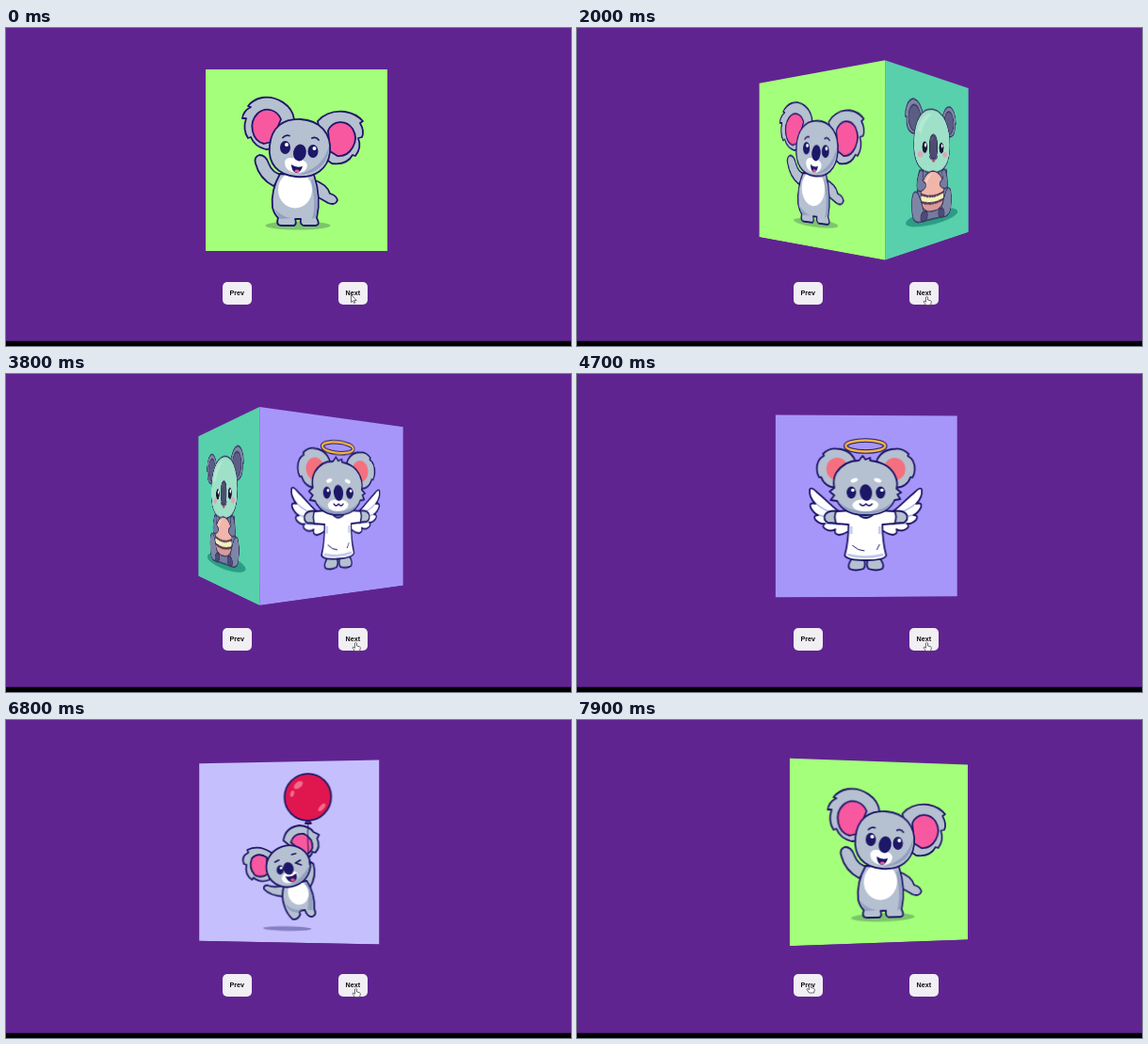
An HTML page for the animation above (8000 ms loop, 600x338 px).

```html
<!DOCTYPE html>
<html lang="en">
<head>
<meta charset="utf-8">
<title>Koala cube</title>
<style>
html, body { margin: 0; width: 100%; height: 100%; overflow: hidden; background: #602491; }
#stage { position: absolute; left: 0; top: 0; width: 600px; height: 338px; overflow: hidden; background: #602491; }
#floor { position: absolute; top: 332px; width: 600px; height: 5px; background: #000; border-top: 1px solid #451a69; }
#scene { position: absolute; left: 212px; top: 44px; width: 193px; height: 193px; perspective: 433px; }
/* The turning axis sits slightly left of the middle of the faces. */
#cube { position: absolute; width: 193px; height: 193px; transform-style: preserve-3d; transform-origin: 95px 50%; }
.face { position: absolute; width: 193px; height: 193px; backface-visibility: hidden; }
.btn {
  position: absolute; top: 270px; width: 30.5px; height: 24px; border-radius: 5px; background: #f1eff3;
  font: bold 7.2px/24px Arial, "Liberation Sans", sans-serif; text-align: center; color: #0c0c0c;
}
#cursor { position: absolute; left: 0; top: 0; }
.ink { stroke: #1d1768; stroke-width: 1.8; stroke-linejoin: round; stroke-linecap: round; }
.soft { stroke: #35315f; stroke-width: 1.4; stroke-linejoin: round; stroke-linecap: round; }
.line { fill: none; }
.fur { fill: #b5c0d0; }
.shade { fill: #93a0c2; }
.pink { fill: #f8589f; }
.white { fill: #fff; }
.navy { fill: #1d1768; }
</style>
</head>
<body>
<div id="stage">
  <div id="floor"></div>
  <div id="scene"><div id="cube">

    <svg class="face" viewBox="212 44 193 193" style="background:#a4ff7a">
      <ellipse cx="310" cy="210" rx="34.5" ry="4.5" fill="#7cc56c"/>
      <g class="ink fur">
        <path d="M306 97C304 82 288 72 272 74Q262 76 257 83L260 84Q252 88 251 96L255 96Q251 108 257 117L260 116Q264 126 276 129L286 128Z"/>
        <path d="M331 99Q342 87 360 89Q372 91 379 99L376 101Q381 110 378 116L374 117Q378 127 371 136L368 135Q362 146 346 144L338 138Z"/>
        <path class="pink" d="M292 97C288 87 276 83 267 91C257 101 261 120 274 123L282 121Z"/>
        <path class="pink" d="M342 109C347 98 361 97 368 107C376 120 366 137 352 136L344 131Z"/>
        <path d="M294 156Q283 155 279 144Q276 135 269 135Q263 137 265 144Q269 160 284 168Z"/>
        <path d="M326 161Q341 166 344 176Q351 178 352 183Q350 189 342 186Q332 180 327 178Z"/>
        <path d="M291 155Q281 172 283 191Q285 198 289 202Q286 210 293 210H306Q309 208 307 203H313Q312 209 316 210H329Q334 209 330 202Q335 180 327 156Z"/>
      </g>
      <path class="shade" d="M326 160Q333 181 329 201L325 203Q330 188 324 162ZM285 192Q293 201 303 202L291 203Z"/>
      <ellipse class="white" cx="307" cy="172" rx="18" ry="19.5"/>
      <path class="ink fur" d="M280 125C282 105 295 96 313 97C333 98 346 112 344 132C342 150 328 160 308 158C288 156 278 144 280 125Z"/>
      <path class="shade" d="M343 125C343 144 330 156 309 156C325 152 338 144 343 125Z"/>
      <path class="white" d="M296 143C297 136 306 138 311 140C319 140 323 146 317 152C311 156 296 154 296 143Z"/>
      <path class="navy" d="M303 145Q308 149 315 147Q313 154 308 154Q303 152 303 145Z"/>
      <ellipse cx="309" cy="152" rx="2.5" ry="1.5" class="pink"/>
      <g class="navy">
        <ellipse cx="312" cy="132.500" rx="6.800" ry="9" transform="rotate(10 312 132)"/>
        <ellipse cx="296.500" cy="127" rx="5.500" ry="7"/>
        <ellipse cx="326" cy="131" rx="5.500" ry="7"/>
      </g>
      <g class="white">
        <circle cx="298" cy="124" r="2"/><circle cx="327.500" cy="128" r="2"/>
      </g>
      <path class="ink line" d="M294 116.500Q297 113 301 114.500M325 117Q329 115 332 119"/>
    </svg>

    <svg class="face" viewBox="212 44 193 193" style="background:#58d0ac">
      <ellipse cx="310.500" cy="206" rx="61.500" ry="8.500" fill="#2c9d85"/>
      <path class="soft" fill="#737d9f" d="M276 152Q268 180 277 208H340Q348 180 341 152Z"/>
      <g id="side">
        <path class="soft" fill="#7e86a6" d="M284 88Q277 74 263 75Q249 79 248 95L251 95Q249 108 260 111Q270 114 280 106Z"/>
        <ellipse class="soft" cx="267" cy="95" rx="12.500" ry="14" fill="#5c5d84"/>
        <path class="soft" fill="#7e86a6" d="M264 176Q257 187 264 203Q271 211 290 207Q284 190 275 178Q269 172 264 176Z"/>
        <ellipse class="soft" cx="287" cy="203" rx="8" ry="5.500" fill="#4d4c75" transform="rotate(-12 287 203)"/>
      </g>
      <use href="#side" transform="translate(615) scale(-1 1)"/>
      <path class="soft" fill="#9fe0c8" d="M265 121C266 97 283 82 308 82C333 82 350 98 350 122C350 145 335 155 308 155C281 155 264 145 265 121Z"/>
      <path fill="#bdebd8" d="M273 108Q282 88 306 87Q290 94 280 111Z" opacity=".7"/>
      <g fill="#d8a9b4"><ellipse cx="279" cy="134" rx="6" ry="3.500"/><ellipse cx="337" cy="134" rx="6" ry="3.500"/></g>
      <g fill="#171532"><ellipse cx="288.500" cy="126" rx="5.800" ry="6.500"/><ellipse cx="328" cy="126" rx="5.800" ry="6.500"/></g>
      <g class="white"><circle cx="290" cy="123.500" r="2.200"/><circle cx="329.500" cy="123.500" r="2.200"/></g>
      <path class="soft line" d="M299 136Q303 141 308 139Q314 141 318 136"/>
      <path fill="#a45c78" d="M303 139H314Q309 147 303 139Z"/>
      <rect class="soft" x="299.500" y="111" width="18" height="28" rx="9" fill="#4d4c70"/>
      <path fill="#74728f" d="M303 120Q303 114 309 114Q304 117 303 120Z"/>
      <path class="soft" fill="#d99b96" d="M281 186H333Q331 199 307 199Q283 199 281 186Z"/>
      <path class="soft" fill="#f4f2b8" d="M280 179Q278 186 284 187Q307 192 331 187Q336 185 333 179Z"/>
      <path class="soft" fill="#efb6a9" d="M281 178Q282 154 307 153Q333 154 334 178Q307 185 281 178Z"/>
      <path class="line" stroke="#5a3453" stroke-width="2.400" stroke-dasharray="5 1" d="M280 178Q307 186 334 178M281 187Q307 193 333 187"/>
      <path fill="#f8d0c3" d="M288 167Q293 157 305 156Q296 160 290 171Z"/>
      <path id="arm" class="soft" fill="#737d9f" d="M279 151Q269 161 272 173Q280 177 290 171Q293 166 287 165L283 162Q286 156 285 153Z"/>
      <use href="#arm" transform="translate(615) scale(-1 1)"/>
    </svg>

    <svg class="face" viewBox="212 44 193 193" style="background:#a796fa">
      <g id="half">
        <path class="ink white" d="M288 150C277 148 266 134 256 126Q249 119 248 123Q247 131 254 138Q247 136 249 142Q252 148 257 150Q251 150 254 155Q259 160 264 159Q260 162 265 165Q270 168 275 165Q273 170 279 171Q287 170 293 163Z"/>
        <path class="line" stroke="#aab7e6" stroke-width="1.500" d="M255 138Q264 146 275 148M258 150Q264 152 270 152M265 159L280 160"/>
        <path class="ink fur" d="M296 92Q291 80 276 79.500Q268 79 262 85L263 87Q255 91 255.500 102Q256 107 258 110L260 109.500Q264 121 277 121Z"/>
        <ellipse cx="277" cy="101" rx="11.500" ry="12" fill="#f5707f"/>
        <path class="ink fur" d="M280 146Q267 144 264 150Q262 155 267 158L281 159Z"/>
        <path class="ink fur" d="M294 194Q287 203 290 207Q296 210 305 207Q308 203 305 196Z"/>
      </g>
      <use href="#half" transform="translate(615) scale(-1 1)"/>
      <path class="ink white" d="M292 145L276 146Q273 151 276 159L289 160Q289 178 285 193Q288 198 307 198Q327 198 329 193Q325 178 325 160L338 159Q341 151 338 146L322 145Z"/>
      <path class="line" stroke="#bdc9eb" stroke-width="2.500" d="M288 192Q306 197 326 192M292 162V170M322 162V170"/>
      <path class="line" stroke="#1d1768" stroke-width="1" d="M293 182Q299 188 306 188M322 181L319 187"/>
      <path class="ink shade" d="M297 147Q307 159 318 147Z"/>
      <path class="ink fur" d="M276 105Q285 92 300 92L304 87L307 91L312 89L312 92Q331 94 338 107Q342 115 340 122L345 126L341 128L344 133L338 134Q331 150 307 150Q285 150 277 135L270 134L274 129L269 125L274 121Q272 112 276 105Z"/>
      <path class="shade" d="M277 134Q288 146 307 146Q328 146 337 134Q331 149 307 149Q285 149 277 134Z"/>
      <path class="white" d="M293 139Q295 133 307 133Q320 133 321 139Q319 146 307 146Q294 146 293 139Z"/>
      <path class="line" stroke="#1d1768" stroke-width="1.300" stroke-linecap="round" d="M301 138Q304 142 307.500 138Q311 142 314 138"/>
      <g class="navy">
        <ellipse cx="307.500" cy="126" rx="6.500" ry="8.800" transform="rotate(-8 307 126)"/>
        <ellipse cx="292" cy="126" rx="5" ry="6.500"/><ellipse cx="323" cy="126" rx="5" ry="6.500"/>
      </g>
      <g class="white">
        <circle cx="293.500" cy="123.500" r="1.800"/><circle cx="324.500" cy="123.500" r="1.800"/>
        <ellipse cx="295" cy="113" rx="4" ry="2" transform="rotate(-20 295 113)"/>
        <ellipse cx="320" cy="113" rx="4" ry="2" transform="rotate(20 320 113)"/>
      </g>
      <g class="line">
        <ellipse cx="307" cy="76.500" rx="21" ry="6" stroke="#1d1768" stroke-width="4.600"/>
        <ellipse cx="307" cy="76.500" rx="21" ry="6" stroke="#f7b942" stroke-width="2.400"/>
      </g>
    </svg>

    <svg class="face" viewBox="212 44 193 193" style="background:#c5c0fd">
      <g transform="translate(1)">
        <ellipse cx="307" cy="222" rx="26" ry="2.500" fill="#877fc3"/>
        <g class="ink fur">
          <path d="M290 141Q277 132 264 138L265 141Q257 145 260 153L263 154Q261 165 269 170L271 168Q278 174 288 170Z"/>
          <path d="M303 128Q305 114 320 112Q331 113 335 119L341 122L339 126Q343 135 337 141L334 140Q333 146 326 147Z"/>
          <path class="pink" d="M285 146Q276 140 269 147Q265 157 272 165Q279 169 286 164Z"/>
          <path class="pink" d="M311 130Q314 120 325 121Q335 126 334 136Q332 142 326 143Z"/>
          <path d="M304 176Q293 179 286 176Q281 176 282 180Q288 187 304 188Z"/>
          <path d="M323 171Q328 163 328 153Q331 149 335 153Q339 165 331 179Z"/>
          <path d="M304 175Q300 187 304 198Q307 207 313 212Q318 213 321 207L320 203L326 202Q329 210 334 209Q339 207 336 201Q337 185 328 171Z"/>
        </g>
        <path class="shade" d="M328 173Q336 185 334 202L329 202Q331 187 326 174ZM304 194Q311 203 322 202L318 205Q308 205 304 194Z"/>
        <ellipse class="white" cx="319" cy="184" rx="11" ry="12.500" transform="rotate(-15 319 184)"/>
        <ellipse class="ink fur" cx="308" cy="155.500" rx="23.800" ry="22" transform="rotate(-20 308 155)"/>
        <path class="shade" d="M330 155Q330 173 310 175.500Q324 168 330 155Z"/>
        <ellipse class="white" cx="310" cy="167" rx="9" ry="6" transform="rotate(-20 310 167)"/>
        <path class="navy" d="M305 166Q311 168 317 163Q319 171 313 172.500Q308 173 305 166Z"/>
        <ellipse cx="313" cy="170" rx="2.400" ry="1.800" fill="#f2457d"/>
        <g class="navy">
          <ellipse cx="308.500" cy="158" rx="5.500" ry="6.800" transform="rotate(-15 308 158)"/>
          <ellipse cx="299.500" cy="159.500" rx="3.800" ry="5"/>
        </g>
        <circle class="white" cx="300.500" cy="157.500" r="1.400"/>
        <path class="ink line" d="M294 151L298 149M312 143L316 142M321 149L316 152L322 154"/>
        <path class="line" stroke="#1d1768" stroke-width="1" d="M329.500 109Q328 130 331 154"/>
        <path class="ink" fill="#e0164f" d="M329.500 105L326.500 110H332.500Z"/>
        <circle class="ink" cx="329" cy="82" r="24.800" fill="#e0164f"/>
        <g fill="#f36b8d">
          <ellipse cx="319" cy="69" rx="5.500" ry="3.200" transform="rotate(-38 319 69)"/>
          <ellipse cx="312.500" cy="78" rx="2" ry="3.500" transform="rotate(15 312 78)"/>
          <ellipse cx="344" cy="93" rx="5" ry="2.300" transform="rotate(-48 344 93)"/>
        </g>
      </g>
    </svg>

  </div></div>
  <div class="btn" style="left:230px">Prev</div>
  <div class="btn" style="left:353px">Next</div>
  <svg id="cursor" width="600" height="338">
    <g id="pointer" fill="#fff" stroke="#333" stroke-width=".7" stroke-linejoin="round">
      <path id="arrow" d="M0 0V8L1.900 6.400L3.200 9L4.400 8.400L3.200 6H5.700Z"/>
      <path id="hand" d="M-1 1Q0-.6 1 1V4L4 4.800Q5 5.200 4.800 6.500L4 9.500H-1L-3.300 6.200Q-3.500 4.800-2.300 5.200L-1 6.300Z"/>
    </g>
  </svg>
</div>
<script>
const LOOP = 8000, STEP = 100, TURN = 2000, HALF = 96.5;
const clicks = [1490, 3020, 4715, 6660];
const get = id => document.getElementById(id);
const clamp = x => Math.max(0, Math.min(1, x));
const smooth = x => x * x * (3 - 2 * x);

// CSS "ease": cubic-bezier(.25, .1, .25, 1)
function ease(x) {
  const bezier = (u, a, b) => 3 * u * (1 - u) ** 2 * a + 3 * u * u * (1 - u) * b + u ** 3;
  let lo = 0, hi = 1;
  for (let i = 0; i < 24; i++) {
    const mid = (lo + hi) / 2;
    if (bezier(mid, .25, .25) < x) lo = mid; else hi = mid;
  }
  return bezier(lo, .1, 1);
}

// Each click retargets the turn from wherever the cube is.
function angleAt(t) {
  return clicks.reduce((angle, start, i) => {
    const end = Math.min(t, clicks[i + 1] ?? LOOP);
    return angle + (90 * (i + 1) - angle) * ease(clamp((end - start) / TURN));
  }, 0);
}

function placeCursor(t) {
  const nudge = smooth(clamp((t - 600) / 400));
  const back = smooth(clamp((t - 7150) / 550));
  const x = 366.5 + 5 * nudge - 124 * back;
  const y = 283.5 + 1.5 * nudge - 4.5 * back;
  const onButton = x < 260.5 || x > 353;
  const hand = t >= 800 && onButton;
  get('pointer').setAttribute('transform', `translate(${x} ${y})`);
  get('hand').style.display = hand ? '' : 'none';
  get('arrow').style.display = hand ? 'none' : '';
}

document.querySelectorAll('.face').forEach((face, i) => {
  face.style.transform = `rotateY(${90 * i}deg) translateZ(${HALF}px)`;
});

const begin = performance.now();
function draw() {
  const elapsed = (performance.now() - begin) % LOOP;
  const t = Math.floor(elapsed / STEP) * STEP;
  get('cube').style.transform = `translateZ(${-HALF}px) rotateY(${-angleAt(t)}deg)`;
  placeCursor(t);
  requestAnimationFrame(draw);
}
draw();
</script>
</body>
</html>
```
